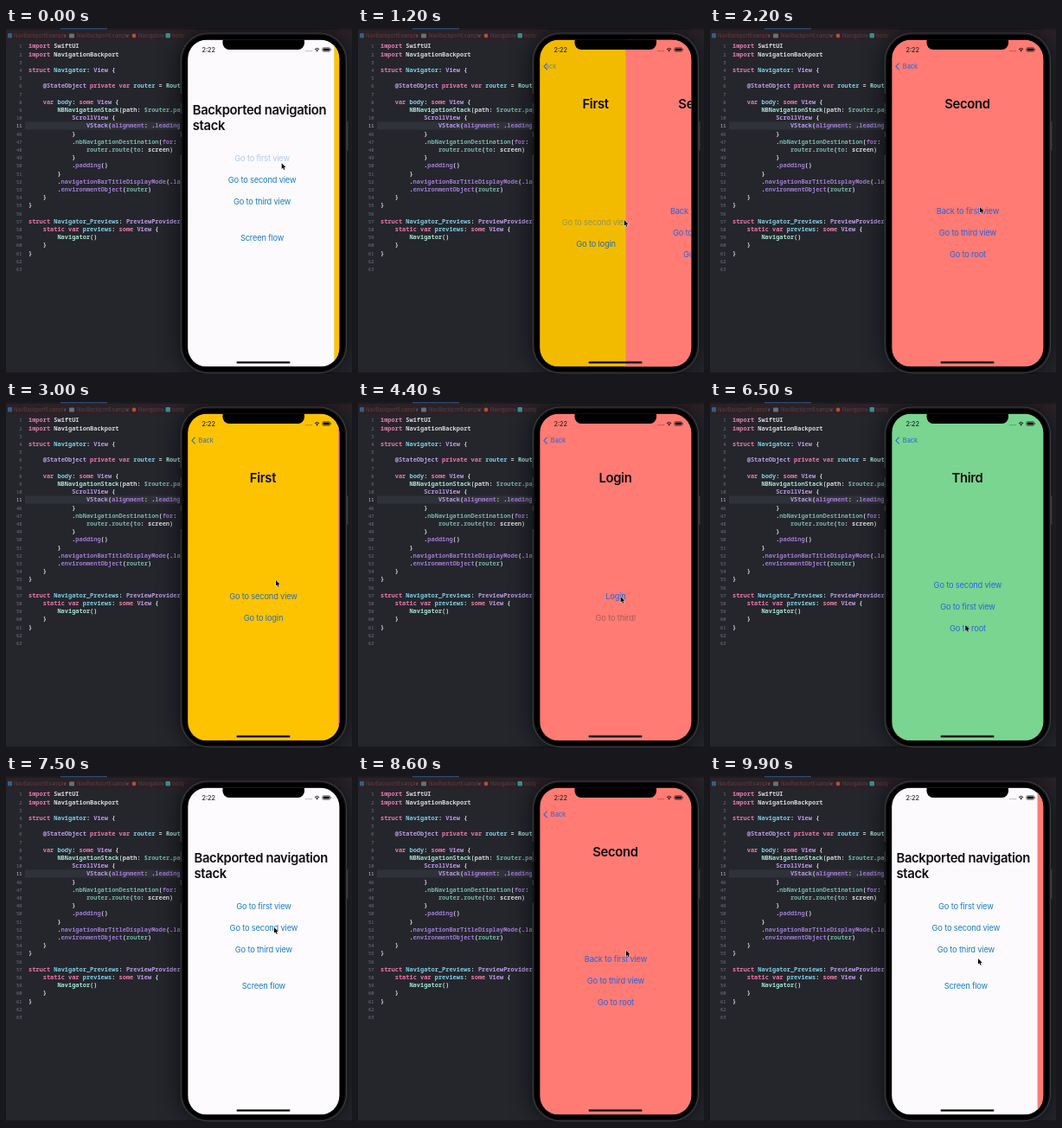
These frames come from a looping animation (400x400 px, 10000 ms). An HTML page with a canvas:

```html
<!DOCTYPE html>
<html lang="en">
<head>
<meta charset="utf-8">
<title>Backported navigation stack</title>
<style>
html, body { margin: 0; width: 100%; height: 100%; overflow: hidden; background: #24262c; }
canvas { display: block; width: 100vw; height: 100vh; }
</style>
</head>
<body>
<canvas id="stage"></canvas>
<script>
const SIZE = 400, LOOP = 10000, STEP = 100;
const canvas = document.getElementById('stage');
const ctx = canvas.getContext('2d');
const scale = Math.max(1, window.devicePixelRatio || 1);
canvas.width = canvas.height = SIZE * scale;

const UI = 'Inter, "Liberation Sans", sans-serif';
const MONO = '"Noto Sans Mono", "DejaVu Sans Mono", monospace';
const SCREEN = { x: 210.2, y: 13.6, w: 175.2, h: 378, r: 22 };
const MID = 297.7;

// Each segment starts with a letter naming its colour.
const INK = { k: '#ee78ae', w: '#d8d8dc', t: '#7fcfe6', p: '#bd9be8', m: '#a5e3d2', f: '#a27ad4', g: '#74b5a4' };
const CODE = [
  [1, 0, 'kimport ~wSwiftUI'],
  [2, 0, 'kimport ~wNavigationBackport'],
  [3],
  [4, 0, 'kstruct ~tNavigator~w: ~pView ~w{'],
  [5],
  [6, 4, 'p@StateObject ~kprivate var ~trouter ~w= ~mRouter()'],
  [7],
  [8, 4, 'kvar ~tbody~w: ~ksome ~pView ~w{'],
  [9, 8, 'mNBNavigationStack~w(path: ~g$router~w.~gpath) {'],
  [10, 12, 'pScrollView ~w{'],
  [11, 16, 'pVStack~w(~falignment~w: .~fleading~w) {'],
  [46, 12, 'w}'],
  [47, 12, 'w.~gnbNavigationDestination~w(~ffor~w: '],
  [48, 16, 'grouter~w.~groute~w(~gto~w: screen)'],
  [49, 12, 'w}'],
  [50, 12, 'w.~fpadding~w()'],
  [51, 8, 'w}'],
  [52, 8, 'w.~fnavigationBarTitleDisplayMode~w(.~flarge)'],
  [53, 8, 'w.~fenvironmentObject~w(~grouter~w)'],
  [54, 4, 'w}'],
  [55, 0, 'w}'],
  [56],
  [57, 0, 'kstruct ~tNavigator_Previews~w: ~pPreviewProvider ~w{'],
  [58, 4, 'kstatic var ~tpreviews~w: ~ksome ~pView ~w{'],
  [59, 8, 'mNavigator~w()'],
  [60, 4, 'w}'],
  [61, 0, 'w}'],
  [62],
  [63]
];

const PAGES = {
  root: {
    fill: '#fdfbfe', link: '#1a7dcb',
    items: [['Go to first view', 150], ['Go to second view', 175], ['Go to third view', 200.5], ['Screen flow', 242.5]]
  },
  first: {
    title: 'First', fill: '#fec300', link: '#2a70b4',
    items: [['Go to second view', 224], ['Go to login', 249]]
  },
  second: {
    title: 'Second', fill: '#ff7b73', link: '#2c63dc',
    items: [['Back to first view', 211], ['Go to third view', 236.5], ['Go to root', 261.5]]
  },
  login: {
    title: 'Login', fill: '#ff7b73', link: '#2c63dc',
    items: [['Login', 224], ['Go to third!', 249]]
  },
  third: {
    title: 'Third', fill: '#79d590', link: '#2568dc',
    items: [['Go to second view', 211], ['Go to first view', 236.5], ['Go to root', 261.5]]
  }
};

// start, from, to, is a pop, index of the tapped item
const MOVES = [
  [-24, 'root', 'first', false, 0],
  [1077, 'first', 'second', false, 0],
  [2430, 'second', 'first', true, 0],
  [3520, 'first', 'login', false, 1],
  [5250, 'login', 'third', false, 1],
  [6560, 'third', 'root', true, 2],
  [7560, 'root', 'second', false, 1],
  [9480, 'second', 'root', true, 0]
];
const LOGIN_TAP = 4550;

// time, x, y of the pointer tip
const PATH = [
  [0, 318.7, 156.3], [300, 318.7, 156.3], [950, 307.8, 222], [1400, 307.8, 222],
  [2200, 312, 207], [3000, 312, 206], [3420, 300, 247], [3750, 300, 247],
  [4300, 303.6, 225], [4700, 303.6, 225], [5100, 304, 247], [5500, 304, 247],
  [6300, 295.3, 258], [6800, 295.3, 258], [7400, 310, 175], [8000, 310, 175],
  [8900, 310, 211], [10000, 310, 211]
];

const clamp = v => Math.max(0, Math.min(1, v));
const smooth = v => v * v * (3 - 2 * v);

function spring(ms) {
  if (ms <= 0) return 0;
  const a = ms * 0.012;
  const p = 1 - (1 + a) * Math.exp(-a);
  return p > 0.998 ? 1 : p;
}

function box(x, y, w, h, r, fill) {
  ctx.beginPath();
  ctx.roundRect(x, y, w, h, r);
  if (fill) { ctx.fillStyle = fill; ctx.fill(); }
}

function text(str, x, y, font, fill, align = 'left', track = 0) {
  ctx.font = font;
  ctx.fillStyle = fill;
  ctx.textAlign = align;
  ctx.letterSpacing = track + 'px';
  ctx.fillText(str, x, y);
}

function withAlpha(a, draw) {
  ctx.save();
  ctx.globalAlpha *= a;
  draw();
  ctx.restore();
}

function drawEditor() {
  ctx.fillStyle = '#24262c';
  ctx.fillRect(0, 0, SIZE, SIZE);
  ctx.fillStyle = '#2a2227';
  ctx.fillRect(0, 0, SIZE, 15);
  ctx.fillStyle = '#1d1b20';
  ctx.fillRect(0, 0, SIZE, 2);
  ctx.fillStyle = '#2c4a70';
  ctx.fillRect(63, 0, 54, 1.4);
  ctx.fillStyle = '#1a1b1f';
  ctx.fillRect(0, 398, SIZE, 2);

  const crumb = '6px ' + UI, dim = '#5e3f42';
  box(2, 6, 5, 5.5, 1, '#2f5f8e');
  text('NavBackportExample', 9, 11, crumb, dim);
  text('›', 67, 11, crumb, '#8a6a6c');
  box(73, 6.5, 6, 5, 1, '#667078');
  text('NavBackportExample', 82, 11, crumb, dim);
  text('›', 139, 11, crumb, '#8a6a6c');
  ctx.beginPath();
  ctx.arc(148, 9, 2.4, 0, 7);
  ctx.fillStyle = '#b04f3a';
  ctx.fill();
  text('Navigator', 153, 11, crumb, dim);
  text('›', 180, 11, crumb, '#8a6a6c');
  box(184.5, 6, 5.5, 5.5, 1, '#358f96');
  text('body', 192, 11, crumb, dim);

  ctx.fillStyle = '#2f3239';
  ctx.fillRect(22, 108.5, 190, 9);
  CODE.forEach(([num, indent, src], i) => {
    const y = 23.4 + i * 9.2;
    text(num, 18.5, y, '5.4px ' + MONO, num === 11 ? '#d5d5d8' : '#73767d', 'right');
    if (!src) return;
    let x = 26 + indent * 4.18;
    for (const seg of src.split('~')) {
      const str = seg.slice(1);
      text(str, x, y, '600 6.97px ' + MONO, INK[seg[0]]);
      x += ctx.measureText(str).width;
    }
  });
}

function drawBody() {
  ctx.save();
  ctx.shadowColor = 'rgba(0,0,0,.65)';
  ctx.shadowBlur = 26 * scale;
  box(201.7, 5.4, 192.4, 394, 32, '#3b3c40');
  ctx.restore();
  box(201, 76, 3, 11, 1, '#17181b');
  box(201, 99, 3, 21, 1, '#17181b');
  box(201, 126, 3, 21, 1, '#17181b');
  box(392.4, 108, 3, 34, 1, '#3a3b3f');
  box(202.8, 6.5, 190.2, 391.8, 31, '#131315');
  box(204.2, 7.9, 187.4, 389, 29.5, '#000');
}

function drawPage(name, dx, t, tapped, tapAlpha) {
  const page = PAGES[name];
  ctx.save();
  ctx.translate(dx, 0);
  ctx.fillStyle = page.fill;
  ctx.fillRect(SCREEN.x, SCREEN.y, SCREEN.w + 1, SCREEN.h);
  const heading = (str, x, y, align) => text(str, x, y, '600 14.8px ' + UI, '#0c0c0e', align, -0.32);
  if (page.title) {
    heading(page.title, MID - 0.3, 92.6, 'center');
  } else {
    heading('Backported navigation', 217.5, 99.9, 'left');
    heading('stack', 217.5, 118.4, 'left');
  }
  page.items.forEach(([label, y], i) => {
    const off = name === 'login' && i === 1 && t < LOGIN_TAP;
    const alpha = off ? 0.45 : i === tapped ? tapAlpha : 1;
    withAlpha(alpha, () =>
      text(label, MID + 0.2, y + 3.6, '9.3px ' + UI, off ? '#3c3c40' : page.link, 'center', -0.18));
  });
  ctx.restore();
}

function backLabel(dx, alpha, fill) {
  ctx.save();
  ctx.beginPath();
  ctx.rect(217, 36, 168, 18);
  ctx.clip();
  ctx.globalAlpha = clamp(alpha);
  text('Back', 222.8 + dx, 47.2, '7.4px ' + UI, fill);
  ctx.restore();
}

// q is how far the upper page covers the lower one.
function drawBack(lower, upper, q) {
  const rooted = lower === 'root';
  const ink = PAGES[q < 0.5 && !rooted ? lower : upper].link;
  withAlpha(rooted ? clamp(q * 1.4 - 0.2) : 1, () => {
    ctx.beginPath();
    ctx.moveTo(218.6, 40.6);
    ctx.lineTo(215, 44.5);
    ctx.lineTo(218.6, 48.4);
    ctx.strokeStyle = ink;
    ctx.lineWidth = 1.1;
    ctx.stroke();
  });
  if (!rooted) backLabel(-q * 25, 1 - q * 0.8, PAGES[lower].link);
  backLabel((1 - q) * 60, (q - 0.5) * 2, PAGES[upper].link);
}

function drawStatus() {
  box(250.5, 8, 94.5, 17, 7.5, '#000');
  text('2:22', 226.4, 27.6, '500 7.3px ' + UI, '#222');
  ctx.fillStyle = 'rgba(0,0,0,.35)';
  for (let i = 0; i < 4; i++) ctx.fillRect(346.3 + i * 2.1, 26, 1.2, 1.2);
  ctx.strokeStyle = '#111';
  ctx.lineWidth = 1;
  for (const r of [1.9, 3.6]) {
    ctx.beginPath();
    ctx.arc(359.6, 27.2, r, -Math.PI * 0.76, -Math.PI * 0.24);
    ctx.stroke();
  }
  ctx.fillStyle = '#111';
  ctx.fillRect(359, 26.2, 1.2, 1.2);
  box(365.8, 22.7, 9, 4.6, 1.3);
  ctx.lineWidth = 0.5;
  ctx.stroke();
  box(366.6, 23.5, 7.4, 3, 0.7, '#111');
  ctx.fillRect(375.4, 24.2, 0.6, 1.6);
  box(266.5, 385.6, 62, 2.2, 1.1, '#0a0a0a');
}

function drawScreen(t) {
  let move = MOVES[0];
  for (const m of MOVES) if (t >= m[0] - 50) move = m;
  const [start, from, to, pop, item] = move;
  const p = spring(t - start);
  const q = pop ? 1 - p : p;
  const [lower, upper] = pop ? [to, from] : [from, to];
  const tapAlpha = 0.36 + 0.64 * clamp((t - start - 60) / 400);
  const show = (name, dx) => drawPage(name, dx, t, name === from ? item : -1, tapAlpha);

  ctx.save();
  box(SCREEN.x, SCREEN.y, SCREEN.w, SCREEN.h, SCREEN.r);
  ctx.clip();
  if (q < 1) {
    show(lower, -0.3 * SCREEN.w * q);
    ctx.fillStyle = `rgba(0,0,0,${0.1 * q})`;
    ctx.fillRect(SCREEN.x, SCREEN.y, SCREEN.w, SCREEN.h);
  }
  if (q > 0) show(upper, SCREEN.w * (1 - q));
  drawBack(lower, upper, q);
  drawStatus();
  ctx.restore();
}

function drawPointer(t) {
  let i = 0;
  while (i < PATH.length - 2 && t >= PATH[i + 1][0]) i++;
  const [t0, x0, y0] = PATH[i], [t1, x1, y1] = PATH[i + 1];
  const k = smooth(clamp((t - t0) / (t1 - t0)));
  ctx.save();
  ctx.translate(x0 + (x1 - x0) * k, y0 + (y1 - y0) * k);
  ctx.beginPath();
  [[0, 0], [0, 6.6], [1.5, 5.3], [2.6, 7.8], [3.7, 7.3], [2.6, 4.9], [4.6, 4.8]]
    .forEach(([x, y]) => ctx.lineTo(x, y));
  ctx.closePath();
  ctx.lineJoin = 'round';
  ctx.lineWidth = 1;
  ctx.strokeStyle = 'rgba(255,255,255,.85)';
  ctx.stroke();
  ctx.fillStyle = '#000';
  ctx.fill();
  ctx.restore();
}

function render(t) {
  ctx.setTransform(scale, 0, 0, scale, 0, 0);
  drawEditor();
  drawBody();
  drawScreen(t);
  drawPointer(t);
}

const begin = performance.now();
function tick() {
  const t = (performance.now() - begin) % LOOP;
  render(Math.floor(t / STEP) * STEP);
  requestAnimationFrame(tick);
}
tick();
</script>
</body>
</html>
```
